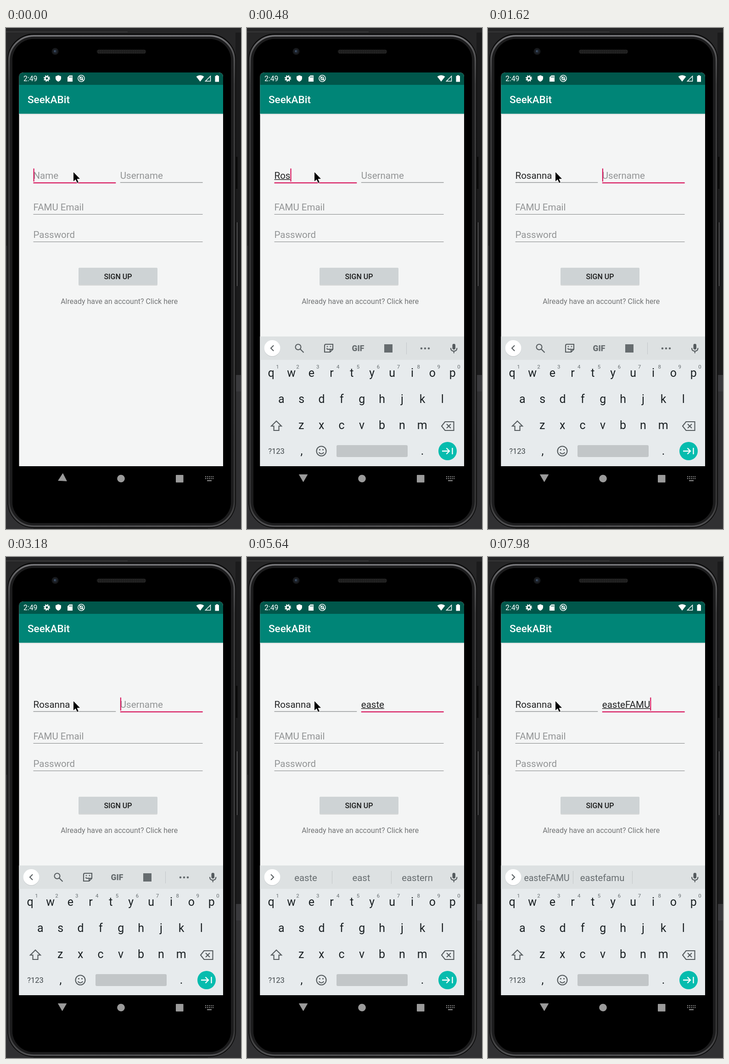
Recreate the animation shown at these times as an HTML page. Size 512x1093 px, loop 8000 ms.

```html
<!DOCTYPE html>
<html lang="en">
<head>
<meta charset="utf-8">
<title>Sign up form</title>
<style>
  html, body { margin: 0; width: 100%; height: 100%; overflow: hidden; background: #242425; }
  svg { display: block; width: 512px; height: 1093px; font-family: Roboto, sans-serif; }
  .mid { text-anchor: middle; }
  .field { font-size: 20.5px; }
  .hint { fill: #929495; }
  .line { fill: none; stroke: #555b5e; stroke-width: 2.1; }
  .white { fill: #fff; }
</style>
</head>
<body>
<svg viewBox="0 0 512 1093">
  <defs>
    <linearGradient id="rim" x1="0" y1="0" x2="0" y2="1">
      <stop offset="0" stop-color="#77777a"/>
      <stop offset=".03" stop-color="#58585a"/>
      <stop offset=".1" stop-color="#3a3a3b"/>
      <stop offset=".95" stop-color="#363637"/>
      <stop offset="1" stop-color="#505052"/>
    </linearGradient>
    <pattern id="mesh" width="4" height="4" patternUnits="userSpaceOnUse">
      <rect width="4" height="4" fill="#1b1b1b"/>
      <circle cx="2" cy="2" r="1" fill="#303030"/>
    </pattern>
    <clipPath id="screen"><path d="M28.500 956V107q0-10 10-10H463q10 0 10 10V956z"/></clipPath>
  </defs>

  <!-- Desktop and phone body -->
  <rect width="512" height="1093" fill="#262627"/>
  <path d="M0 475h60v618H0z" fill="#303032"/>
  <path d="M0 8.500H265" stroke="#464646"/>
  <path d="M500 10h12v747h-12z" fill="#1b1b1c"/>
  <path d="M440 757h72v36h-72z" fill="#39393c"/>
  <path d="M440 793h72v300h-72z" fill="#303032"/>
  <path d="M502 281v70M503 424v139" stroke="#0a0a0a" stroke-width="5"/>
  <path d="M503.500 424v139" stroke="#5c5c5e" stroke-width="2"/>
  <rect x="3" y="12" width="498" height="1079" rx="58" fill="#0b0b0b"/>
  <g fill="none">
    <rect x="10" y="20" width="484" height="1064" rx="51" stroke="#1c1c1d" stroke-width="8"/>
    <rect x="6.500" y="17" width="491" height="1070" rx="54" stroke="url(#rim)" stroke-width="3.500"/>
  </g>
  <rect x="14" y="24" width="476" height="1056" rx="46"/>
  <circle cx="107" cy="51" r="7.500" fill="#17191c"/>
  <circle cx="107" cy="51" r="4" fill="#222a35"/>
  <circle cx="106.500" cy="50.500" r="1.500" fill="#4b6280"/>
  <rect x="198" y="47" width="107" height="9" rx="4.500" fill="url(#mesh)"/>

  <g clip-path="url(#screen)">
    <path d="M28 97h446v859H28z" fill="#f4f5f5"/>
    <path d="M28 187h446v2H28z" fill="#dcdfdf"/>
    <path d="M28 97h446v27H28z" fill="#00574b"/>
    <path d="M28 124h446v63H28z" fill="#008577"/>

    <!-- Status bar -->
    <g class="white">
      <text x="38" y="116" font-size="15.800">2:49</text>
      <g fill="none" stroke="#fff">
        <circle cx="89" cy="110" r="3.800" stroke-width="2.800"/>
        <circle cx="89" cy="110" r="5.900" stroke-width="2.400" stroke-dasharray="2.400 2.230"/>
        <circle cx="164" cy="110" r="7" stroke-width="1.600"/>
        <circle cx="164" cy="110" r="3.200" stroke-width="1.600"/>
        <path d="M160 106l8.500 8.500" stroke-width="1.600"/>
        <path d="M434.500 116h11v-11z" stroke-width="1.500"/>
      </g>
      <path d="M114 103l6 2.400v4.200c0 3.500-2.500 6.200-6 7.400c-3.500-1.200-6-3.900-6-7.400v-4.200z"/>
      <path d="M138 103.500h7v13.500h-11v-9.500z"/>
      <path d="M138.500 105.500v3m2.300-3v3m2.300-3v3" stroke="#00574b" stroke-width="1.100"/>
      <path d="M414.500 106q8.500-6 17 0l-8.500 11z"/>
      <path d="M455.500 104.500h2.500v-1.500h3.500v1.500h2.500v13h-8.500z"/>
      <text x="47" y="164" font-size="22.500" font-weight="500">SeekABit</text>
    </g>

    <!-- Form -->
    <g id="fields"></g>
    <g class="field hint">
      <text x="59.500" y="398">FAMU Email</text>
      <text x="59.500" y="458">Password</text>
    </g>
    <path d="M59.500 406.500h369M59.500 466.500h369" stroke="#828485" stroke-width="1.200"/>
    <rect x="158" y="524" width="172" height="38" rx="2" fill="#c9cbcb" opacity=".7"/>
    <rect x="158" y="523" width="172" height="37" rx="2" fill="#ced3d5"/>
    <text class="mid" x="244" y="547.500" font-size="16" font-weight="500" fill="#1b1c1c">SIGN UP</text>
    <text class="mid" x="246.700" y="601.500" font-size="16" fill="#737576">Already have an account? Click here</text>

    <!-- On-screen keyboard -->
    <g id="keyboard">
      <path d="M28 673h446v283H28z" fill="#e7ebed"/>
      <path d="M28 673h446v51H28z" fill="#dde1e2"/>
      <circle cx="55" cy="699.500" r="17.500" fill="#bfc4c6"/>
      <circle cx="55" cy="698.500" r="17.500" class="white"/>
      <path id="chevron" class="line"/>
      <rect x="447.500" y="689" width="6.500" height="12.500" rx="3.200" fill="#555b5e"/>
      <path class="line" d="M444 698q0 7 6.700 7t6.700-7M450.700 705v4.500"/>
      <g id="tools" fill="#666c6f">
        <circle class="line" cx="111.500" cy="696" r="6"/>
        <path class="line" d="M116 700.500l7.500 7.500"/>
        <path class="line" d="M172 690h15v11l-6 6h-12v-14q0-3 3-3zM187 701h-6v6M173.500 699q3 4 7 1"/>
        <circle cx="175" cy="695" r="1.400"/><circle cx="182" cy="695" r="1.400"/>
        <text class="mid" x="242" y="704.500" font-size="17.500" font-weight="900">GIF</text>
        <rect x="299" y="690" width="18" height="18"/>
        <path d="M347.500 686v26" stroke="#c3c8ca"/>
        <circle cx="380" cy="699" r="2.300"/><circle cx="388" cy="699" r="2.300"/><circle cx="396" cy="699" r="2.300"/>
      </g>
      <g id="words" fill="#666c6f">
        <path d="M185.500 685v28M314.500 685v28" stroke="#c3c8ca"/>
        <text class="mid" x="128" y="706.500"></text>
        <text class="mid" x="249" y="706.500"></text>
        <text class="mid" x="371" y="706.500"></text>
      </g>
      <g id="keys" class="mid" font-size="25" fill="#1a2023"></g>
      <path class="line" d="M64 857.500l11 11h-5.500v9.500h-11v-9.500h-5.500z"/>
      <path class="line" d="M424 868.500l7.500-9.500h19v19h-19zM435 864l9 9m0-9l-9 9"/>
      <circle class="line" cx="162" cy="923" r="10.500"/>
      <path class="line" d="M156.500 926q5.500 6 11 0"/>
      <circle cx="158.500" cy="920" r="1.600" fill="#555b5e"/><circle cx="165.500" cy="920" r="1.600" fill="#555b5e"/>
      <rect x="195" y="910" width="155" height="26" rx="3" fill="#c2c6c8"/>
      <circle cx="437" cy="923" r="20" fill="#06bcae"/>
      <path d="M425 923h16M434.500 916.500l6.500 6.500l-6.500 6.500M447.500 916v14" fill="none" stroke="#fff" stroke-width="2.300"/>
    </g>
  </g>

  <!-- Navigation bar -->
  <g fill="#9b9b9b">
    <path id="back" d="M-10.500 0L5.250 -9.100V9.100z" stroke="#9b9b9b" stroke-linejoin="round"/>
    <circle cx="250.500" cy="983" r="8.300"/>
    <rect x="370" y="975" width="16.500" height="16.500" rx="1"/>
    <path d="M434 979h18M434 983h18" stroke="#9b9b9b" stroke-width="2" stroke-dasharray="2 2"/>
    <path d="M438 987.500h10" stroke="#9b9b9b" stroke-width="2"/>
  </g>

  <!-- Mouse pointer -->
  <path d="M146.500 313.500v22l5-4.500l3.300 7.500l3.700-1.700l-3.300-7.200h6.800z"
        fill="#000" stroke="#fff" stroke-width="1" stroke-linejoin="round"/>
</svg>

<script>
const LOOP = 8000, BLINK = 450;
const byId = id => document.getElementById(id);
const ease = p => 1 - (1 - Math.min(1, Math.max(0, p))) ** 3;

// [time, focused field, its text, word suggestions]
const steps = [
  [0, 0, ""],
  [240, 0, "R"],
  [330, 0, "Ro"],
  [420, 0, "Ros"],
  [600, 0, "Rosa", ["Rosa", "Rosanna", "Rosalie"]],
  [720, 0, "Rosan", ["Rosan", "Rosanna", "Rosa"]],
  [840, 0, "Rosann", ["Rosann", "Rosanna", "Rosa"]],
  [960, 0, "Rosanna", ["Rosanna", "Rosannah", "Rosa"]],
  [1350, 1, ""],
  [4260, 1, "e", ["e", "E", "even"]],
  [4500, 1, "ea", ["ea", "Ea", "each"]],
  [4800, 1, "eas", ["eas", "East", "easy"]],
  [4960, 1, "east", ["east", "East", "eastern"]],
  [5130, 1, "easte", ["easte", "east", "eastern"]],
  [7020, 1, "easteF", ["easteF", "eastef", ""]],
  [7230, 1, "easteFA", ["easteFA", "eastefa", ""]],
  [7440, 1, "easteFAM", ["easteFAM", "eastefam", ""]],
  [7650, 1, "easteFAMU", ["easteFAMU", "eastefamu", ""]],
];

function addFields() {
  const fields = [[59.5, "Name"], [248.8, "Username"]];
  byId("fields").innerHTML = fields.map(([x]) => `<g>
    <text class="field" x="${x}" y="329"></text>
    <rect x="${x}" height="1.2" y="330"/>
    <rect x="${x}" width="179.8"/>
    <rect y="306.5" width="2.2" height="28.5" fill="#d81b60"/></g>`).join("");
  return fields.map(([x, hint], i) => {
    const [text, composing, line, cursor] = byId("fields").children[i].children;
    return { x, hint, text, composing, line, cursor };
  });
}

function addKeys() {
  const label = (x, y, s, style = "") => `<text x="${x}" y="${y}" ${style}>${s}</text>`;
  const row = (s, x, y) => [...s].map((c, i) => label(x + i * 43.9, y, c)).join("");
  byId("keys").innerHTML = row("qwertyuiop", 52.7, 761) + row("asdfghjkl", 74.7, 818) +
    row("zxcvbnm", 118.3, 875) + label(119, 931, ",") + label(382, 931, ".") +
    label(64, 929, "?123", 'font-size="16.500" fill="#40474a"') +
    [..."1234567890"].map((c, i) =>
      label(66.5 + i * 43.9, 743, c, 'font-size="11.500" fill="#666d70"')).join("");
}

function drawField(field, value, focused, cursorOn) {
  const { x, hint, text, composing, line, cursor } = field;
  text.textContent = value || hint;
  text.setAttribute("fill", value ? "#222324" : "#929495");
  const width = value ? text.getComputedTextLength() : 0;
  composing.setAttribute("width", focused ? width : 0);
  line.setAttribute("y", focused ? 336.7 : 336.5);
  line.setAttribute("height", focused ? 2.3 : 1.2);
  line.setAttribute("fill", focused ? "#d81b60" : "#828485");
  cursor.setAttribute("x", x + width);
  cursor.setAttribute("opacity", focused && cursorOn ? 1 : 0);
}

function drawSuggestions(words) {
  byId("tools").style.display = words ? "none" : "";
  byId("words").style.display = words ? "" : "none";
  byId("chevron").setAttribute("d", words ? "M52 692.500l6 6l-6 6" : "M58 692.500l-6 6l6 6");
  if (!words) return;
  byId("words").querySelectorAll("text").forEach((node, i) => {
    const size = 20.3, room = 99;
    node.textContent = words[i];
    node.style.fontSize = size + "px";
    const width = node.getComputedTextLength();
    if (width > room) node.style.fontSize = size * room / width + "px";
  });
}

const fields = addFields();
let shown;
addKeys();

function draw() {
  const t = performance.now() % LOOP;
  const step = steps.findLast(s => s[0] <= t);
  const [start, focus, value, words] = step;
  const cursorOn = (t - start) % (2 * BLINK) < BLINK;

  drawField(fields[0], focus ? "Rosanna" : value, !focus, cursorOn);
  drawField(fields[1], focus ? value : "", !!focus, cursorOn);
  if (shown !== step) drawSuggestions(words);
  shown = step;

  const rise = ease((t - 60) / 220), turn = ease(t / 180);
  byId("keyboard").setAttribute("transform", `translate(0 ${283 * (1 - rise)})`);
  byId("back").setAttribute("transform",
    `translate(${123.3 - 0.7 * turn} ${982.5 - 3 * turn}) rotate(${-26 - 64 * turn})`);
  requestAnimationFrame(draw);
}
draw();
</script>
</body>
</html>
```
